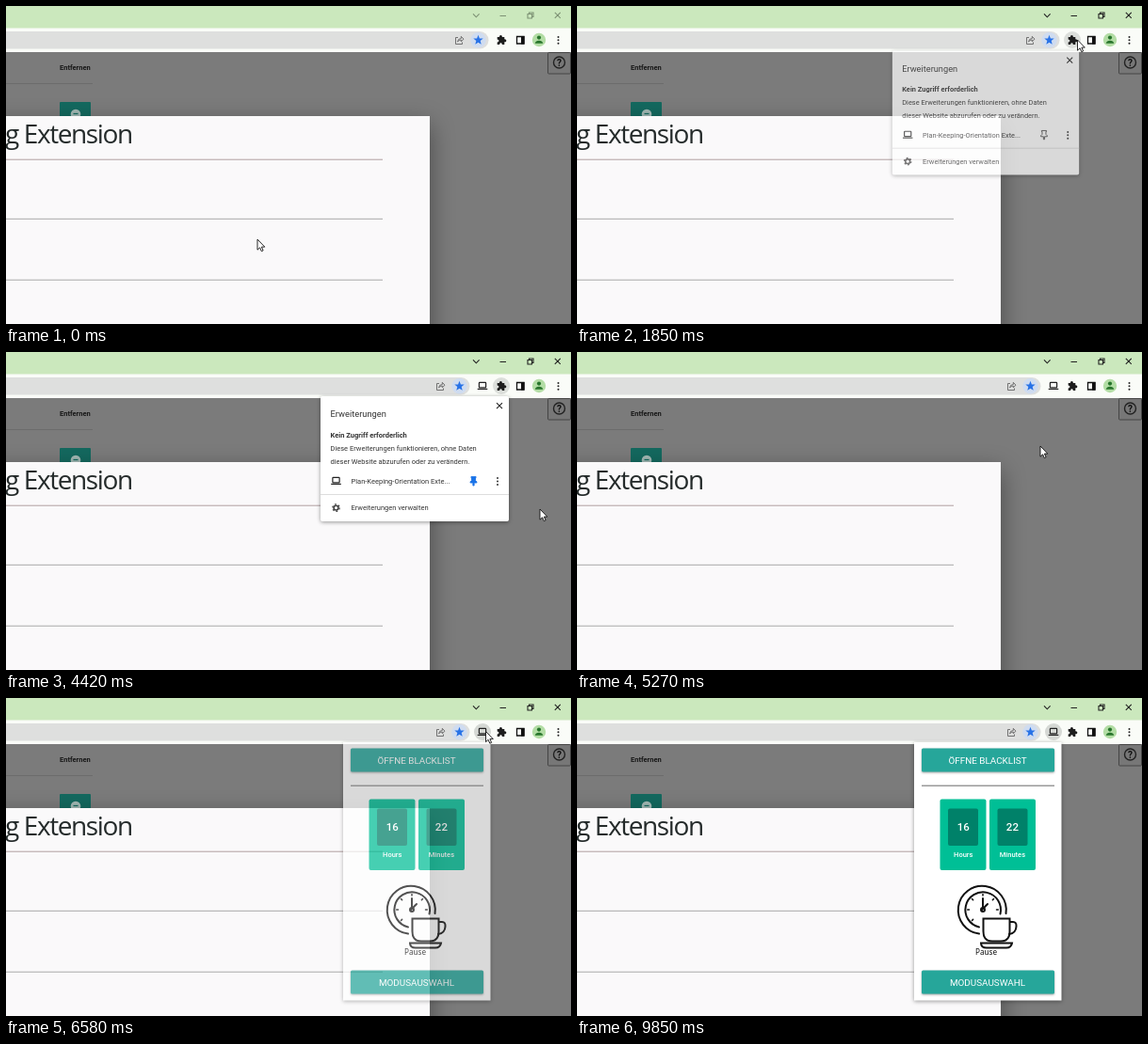
Recreate the animation shown at these times as an HTML page. Size 600 by 338 pixels, loop 10000 ms.

```html
<!DOCTYPE html>
<html lang="de">
<head>
<meta charset="utf-8">
<title>Erweiterung anheften</title>
<style>
html, body { margin: 0; height: 100%; overflow: hidden; }
svg { display: block; width: 100vw; height: 100vh; font: 7.5px Roboto, sans-serif; }
.line { fill: none; stroke: #222; stroke-width: 1.1; }
.modal { filter: drop-shadow(0 9px 13px rgba(0, 0, 0, .42)); }
.popup { filter: drop-shadow(0 1px 2px rgba(0, 0, 0, .4)); }
.button { filter: drop-shadow(0 1px 1px rgba(0, 0, 0, .35)); }
.mid { text-anchor: middle; fill: #fff; }
.cap { font-size: 9.9px; }
.num { font-size: 11.5px; font-weight: 500; }
.bold { font-weight: 700; }
#extensions { transform-origin: 434px 114px; }
</style>
</head>
<body>
<svg viewBox="0 0 600 338">
  <defs>
    <g id="laptop">
      <rect x="-3.6" y="-3.6" width="7.2" height="5.4" rx=".6" fill="none" stroke="#222" stroke-width="1.2"/>
      <path d="M-5.3 2.8H5.3V4H-5.3Z" fill="#222"/>
    </g>
    <g id="dots"><circle cy="-3.4" r="1"/><circle r="1"/><circle cy="3.4" r="1"/></g>
    <path id="pinShape" d="M-2.6-4.4H2.6V-3.4H2V-.4L3.4 1V2H.6V5H-.6V2H-3.4V1L-2-.4V-3.4H-2.6Z"/>
  </defs>

  <!-- Page behind the dialog -->
  <rect width="600" height="338" fill="#7b7b7b"/>
  <text class="bold" x="57" y="68" fill="#181818">Entfernen</text>
  <path d="M0 82.5H92" stroke="#6c6c6c"/>
  <rect x="57" y="102" width="33" height="20" rx="1" fill="#14695f"/>
  <circle cx="74" cy="115" r="5.3" fill="#a3b9b5"/>
  <path d="M71.5 114.5H76.5" stroke="#14695f" stroke-width="1.3"/>
  <rect x="575.5" y="49.5" width="24" height="22.5" rx="1" fill="#777" stroke="#454545"/>
  <circle class="line" cx="587.5" cy="60" r="6" style="stroke-width:1.4"/>
  <text class="bold" x="587.5" y="63.6" text-anchor="middle" font-size="10" fill="#111">?</text>

  <g class="modal"><rect x="-20" y="117" width="470" height="260" fill="#faf9fa"/></g>
  <text x="-1" y="146.3" fill="#252b2b" style="font:28px 'Open Sans',sans-serif;letter-spacing:-1.4px">g Extension</text>
  <path d="M0 163.2H400" stroke="#b09fa0"/>
  <path d="M0 226.3H400M0 291.2H400" stroke="#a8a8a8"/>

  <!-- Browser frame -->
  <rect width="600" height="24" fill="#cbe8bd"/>
  <rect y="23.5" width="600" height="25.5" fill="#fafcf8"/>
  <g id="windowKeys" class="line">
    <path d="M496 8.3L499.3 11.8L502.6 8.3M524.5 10.5H531M582.8 6.8L588.8 12.8M588.8 6.8L582.8 12.8"/>
    <path d="M554 8.5H558.5V13H554ZM555.5 8.3V7H560V11.5H558.7"/>
  </g>
  <g id="address">
    <rect x="-60" y="27" width="572.5" height="18.5" rx="9.2" fill="#dedfde"/>
    <circle cx="501.5" cy="36.2" r="8.2" fill="#cfdcf0"/>
    <path d="M501.5 30.8L502.9 34.4L506.7 34.6L503.7 37.1L504.7 40.8L501.5 38.7L498.3 40.8L499.3 37.1L496.3 34.6L500.1 34.4Z" fill="#2872e6"/>
    <path d="M480 33.5H477.5V40.5H484.5V38.5M479.5 38Q480 34.5 483.3 34.5V32.3L486 35.2L483.3 37.8V36Q481 36 479.5 38Z" class="line" style="stroke:#666;stroke-width:.9"/>
  </g>
  <circle id="extensionHover" cx="526" cy="36" r="9" fill="#dcdfdb"/>
  <circle id="timerHover" cx="506" cy="36" r="9" fill="#d5d8d4"/>
  <use id="pinned" href="#laptop" x="506" y="36"/>
  <path d="M521.7 33H524C523.5 30.3 527.3 30.3 526.9 33H529.3V35.2C532 34.9 532 38.6 529.3 38.3V40.9H526.8C527 38.6 524 38.6 524.2 40.9H521.7V38.4C524 38.4 524 35.4 521.7 35.4Z" fill="#1d1d1d"/>
  <path d="M542.5 32.5H550V40H542.5Z" fill="none" stroke="#111" stroke-width="1.3"/>
  <path d="M547 32H550.5V40.5H547Z" fill="#111"/>
  <circle cx="566" cy="36" r="7.2" fill="#b3dda5"/>
  <g fill="#28752c"><circle cx="566" cy="33.6" r="2.1"/><path d="M561.8 39.8C562 35.8 570 35.8 570.2 39.8Z"/></g>
  <use href="#dots" x="586.5" y="36.3" fill="#222"/>

  <!-- Extension list -->
  <g id="extensions">
    <g class="popup"><rect x="334" y="47" width="200" height="133" rx="2" fill="#fff"/></g>
    <g fill="#333">
      <text x="344.5" y="69.2" font-size="9.3">Erweiterungen</text>
      <text class="bold" x="344.5" y="90.8">Kein Zugriff erforderlich</text>
      <text x="344.5" y="104.8">Diese Erweiterungen funktionieren, ohne Daten</text>
      <text x="344.5" y="118.6">dieser Website abzurufen oder zu verändern.</text>
      <text x="366.5" y="139.8">Plan-Keeping-Orientation Exte...</text>
      <text x="366.5" y="168.3">Erweiterungen verwalten</text>
      <use href="#dots" x="522" y="137.5"/>
    </g>
    <path class="line" d="M521 54.2L527 60.2M527 54.2L521 60.2"/>
    <path d="M334 151.5H534" stroke="#ddd"/>
    <use href="#laptop" x="350.5" y="137"/>
    <use id="pin" href="#pinShape" x="496.5" y="137" stroke-width=".9"/>
    <g fill="none" stroke="#444">
      <circle cx="350.5" cy="165.6" r="2.4" stroke-width="1.6"/>
      <circle cx="350.5" cy="165.6" r="3.7" stroke-width="1.3" stroke-dasharray="1.9 1.97"/>
    </g>
  </g>

  <!-- Break timer -->
  <g id="timer">
    <g class="popup"><rect x="358" y="47" width="156.5" height="274.5" fill="#fff"/></g>
    <g class="button" fill="#26a69a">
      <rect x="366" y="53.5" width="141" height="25" rx="1.5"/>
      <rect x="366" y="289.5" width="141" height="25" rx="1.5"/>
    </g>
    <path d="M366 93.2H507" stroke="#999" stroke-width="1.4"/>
    <g fill="#00bf96"><rect x="385.5" y="107.5" width="49" height="75.5" rx="2"/><rect x="438" y="107.5" width="49" height="75.5" rx="2"/></g>
    <g fill="#008169"><rect x="394" y="117.5" width="32" height="39.5" rx="2"/><rect x="446.5" y="117.5" width="32" height="39.5" rx="2"/></g>
    <g class="mid">
      <text class="cap" x="436" y="69.7">ÖFFNE BLACKLIST</text>
      <text class="cap" x="436" y="305.5">MODUSAUSWAHL</text>
      <text class="num" x="410.2" y="141">16</text>
      <text class="num" x="462.4" y="141">22</text>
      <text x="410.2" y="169.3" font-weight="500">Hours</text>
      <text x="462.4" y="169.3" font-weight="500">Minutes</text>
    </g>
    <g fill="none" stroke="#111" stroke-width="2" stroke-linecap="round">
      <path d="M427 250.6A25.5 25.5 0 1 1 455.5 229M441 202"/>
      <path d="M427 243.5A18.8 18.8 0 1 1 449.5 229.5"/>
      <path d="M431 213V224L436 219"/>
      <circle cx="431" cy="225" r="2"/>
      <path d="M431 208.5V210M414.7 225H416.5M445.5 225H447.3M419.5 213.5L420.6 214.6M442.5 213.5L441.4 214.6M419.5 236.5L420.6 235.4" stroke-width="1.5"/>
      <path d="M431.5 234.5H459.5V248Q459.5 258.5 450 258.5H441Q431.5 258.5 431.5 248Z" fill="#fff"/>
      <path d="M460 238H463Q467 238 466.5 243Q466 250 459 251"/>
      <path d="M429 260.5H462Q461 265.5 456 265.5H435Q429 265.5 429 260.5Z" fill="#fff"/>
    </g>
    <text x="434.5" y="273.2" text-anchor="middle" fill="#111" style="font:8.2px 'Noto Sans',sans-serif">Pause</text>
  </g>

  <path id="cursor" d="M0 0V11.2L2.6 8.8L4.3 12.7L6.1 11.9L4.4 8.1H7.8Z" fill="#fff" stroke="#111" stroke-width=".9"/>
</svg>
<script>
const LOOP = 10000;
// Cursor stops: time, x, y
const stops = [
  [30, 267, 248], [520, 496, 123], [820, 496, 123], [1550, 531.5, 36],
  [2060, 531.5, 36], [2790, 495, 138], [3500, 495, 138], [3940, 534, 151],
  [4300, 567, 167], [4980, 567, 167], [5270, 492, 100], [5700, 509.5, 35.5],
  [7200, 509.5, 35.5], [7700, 382, 101], [7800, 382, 101], [8120, 400, 290],
  [8500, 400, 295], [9050, 425, 342]
];
const $ = id => document.getElementById(id);
const ramp = (t, from, to) => Math.min(1, Math.max(0, (t - from) / (to - from)));
const show = (id, amount) => $(id).style.opacity = +amount;

function cursorAt(t) {
  const next = stops.findIndex(s => s[0] > t);
  if (next <= 0) return stops.at(next).slice(1);
  const [t0, x0, y0] = stops[next - 1], [t1, x1, y1] = stops[next];
  const k = ramp(t, t0, t1), e = k * k * (3 - 2 * k);
  return [x0 + (x1 - x0) * e, y0 + (y1 - y0) * e];
}

function draw(t) {
  const pinned = t >= 2970;
  const listOpen = ramp(t, 1700, 1910) * (1 - ramp(t, 5000, 5100));
  $('windowKeys').style.stroke = t < 1700 ? '#7d9274' : '#222';
  $('address').setAttribute('transform', `translate(${pinned ? -20 : 0})`);
  show('pinned', pinned);
  $('pin').setAttribute('fill', pinned ? '#1a73e8' : '#fff');
  $('pin').setAttribute('stroke', pinned ? '#1a73e8' : '#444');
  show('extensionHover', t > 1450 && t < 5030);
  show('timerHover', t > 5630);
  show('extensions', listOpen);
  $('extensions').style.transform = `scale(${.97 + .03 * listOpen})`;
  show('timer', ramp(t, 6430, 6640));
  $('cursor').setAttribute('transform', `translate(${cursorAt(t)})`);
}

function frame() {
  draw(performance.now() % LOOP);
  requestAnimationFrame(frame);
}
frame();
</script>
</body>
</html>
```
